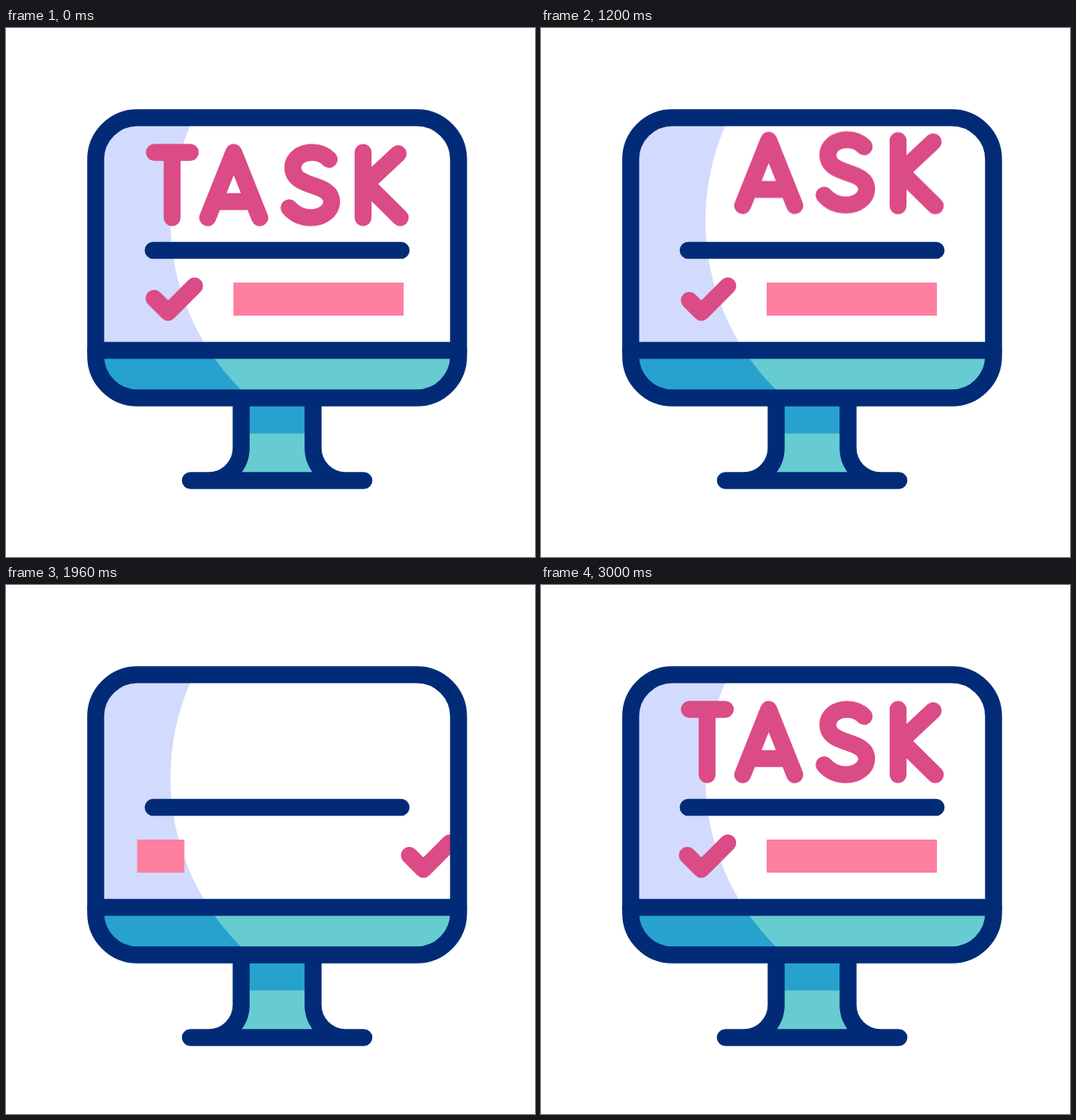
These frames come from a looping animation (640x640 px, 3020 ms). An HTML page:

```html
<!DOCTYPE html>
<html lang="en">
<head>
<meta charset="utf-8">
<title>Task monitor</title>
<style>
  html, body { margin: 0; width: 100%; height: 100%; overflow: hidden; background: #fff; }
  svg { display: block; width: 100vw; height: 100vh; }

  .line { fill: none; stroke: #022b77; stroke-width: 20.5; stroke-linecap: round; }
  .ink { fill: none; stroke: #db4b86; stroke-width: 20.5; stroke-linecap: round; stroke-linejoin: round; }
  .bar { fill: #ff7fa1; }
  .teal { fill: #66ccd1; }
  .blue { fill: #27a2ce; }

  /* Letters: rise, drop behind the rule, come back from above */
  .letter { animation: letter 3020ms calc(var(--i) * 200ms) infinite; }
  @keyframes letter {
    0% { transform: translateY(0); animation-timing-function: cubic-bezier(.2, .6, .4, .9); }
    28%, 33.11% { transform: translateY(-15.5px); animation-timing-function: linear; }
    39.74% { transform: translateY(130px); animation-timing-function: step-end; }
    39.76%, 66.23% { transform: translateY(-122px); animation-timing-function: cubic-bezier(.2, .6, .4, .97); }
    79.47%, 100% { transform: translateY(0); }
  }

  /* Task row: the old one slides away, a new one is drawn; twice per loop */
  .out, .bar-in, .check-in { animation: 1510ms linear infinite; }
  .out { animation-name: slide; }
  .bar-in { animation-name: grow; }
  .check-in { animation-name: draw; stroke-dasharray: 100 200; }

  @keyframes slide {
    0% { transform: translateX(0); animation-timing-function: cubic-bezier(.15, .5, .6, .71); }
    39.74%, 100% { transform: translateX(375px); }
  }
  @keyframes grow {
    0%, 21.2% { x: 119px; width: 0; }
    23.84% { x: 125px; width: 25px; }
    50.33% { x: 273px; width: 166px; }
    52.98% { x: 273px; width: 190px; }
    56.3% { x: 273px; width: 225px; animation-timing-function: ease-out; }
    60.9% { x: 273px; width: 232px; animation-timing-function: ease-in-out; }
    76.2%, 100% { x: 273px; width: 206px; }
  }
  @keyframes draw {
    0%, 51.98% { opacity: 0; stroke-dashoffset: 100; }
    52% { opacity: 1; stroke-dashoffset: 100; animation-timing-function: cubic-bezier(.15, .6, .4, .9); }
    87.1%, 100% { opacity: 1; stroke-dashoffset: 0; }
  }
</style>
</head>
<body>
<svg viewBox="0 0 640 640">
  <defs>
    <clipPath id="case"><rect x="108.5" y="108.5" width="439" height="339" rx="50.5"/></clipPath>
    <clipPath id="screen"><rect x="119" y="118" width="418.5" height="270"/></clipPath>
    <clipPath id="head"><rect x="119" y="118" width="418.5" height="151"/></clipPath>
    <clipPath id="chin"><rect x="108" y="390" width="440" height="60"/></clipPath>
    <path id="check" pathLength="100" d="M226 312L194 344L177 327"/>
  </defs>

  <!-- stand -->
  <path class="teal" d="M284.5 447V508A39.5 39.5 0 0 1 245 547.5H411A39.5 39.5 0 0 1 371.5 508V447Z"/>
  <rect class="blue" x="285" y="447" width="86" height="43.5"/>
  <path class="line" d="M284.5 447V508A39.5 39.5 0 0 1 245 547.5M371.5 447V508A39.5 39.5 0 0 0 411 547.5M223 547.5H433"/>

  <!-- screen and chin -->
  <g clip-path="url(#case)">
    <rect x="108" y="108" width="440" height="282" fill="#d2dbfd"/>
    <circle cx="487" cy="233" r="288" fill="#fff"/>
    <g clip-path="url(#chin)">
      <rect class="blue" x="108" y="390" width="440" height="60"/>
      <circle class="teal" cx="487" cy="233" r="288"/>
    </g>
  </g>

  <g clip-path="url(#screen)">
    <g class="out">
      <use href="#check" class="ink"/>
      <rect class="bar" x="273" y="308" width="206" height="40"/>
    </g>
    <use href="#check" class="ink check-in"/>
    <rect class="bar bar-in" y="308" height="40"/>
  </g>

  <g clip-path="url(#head)" class="ink">
    <path class="letter" style="--i:0" d="M179.5 150.5H223M201 150.5V229.5"/>
    <path class="letter" style="--i:1" d="M244 229.5L275.5 150.5L307 229.5M253 210H298"/>
    <path class="letter" style="--i:2" d="M391 159C386 153.5 378 150.5 370 150.5C357 150.5 347 158.5 347 169C347 181 357 185.5 370 190C384 194.5 394 199 394 210C394 221.5 382 229.5 369 229.5C358 229.5 349 225 342.5 217.5"/>
    <path class="letter" style="--i:3" d="M432 150.5V229.5M474.5 152L435.5 188.5L477 229.5"/>
  </g>

  <path class="line" d="M178 269H478M108.5 390H547.5"/>
  <rect class="line" x="108.5" y="108.5" width="439" height="339" rx="50.5"/>
</svg>
</body>
</html>
```
